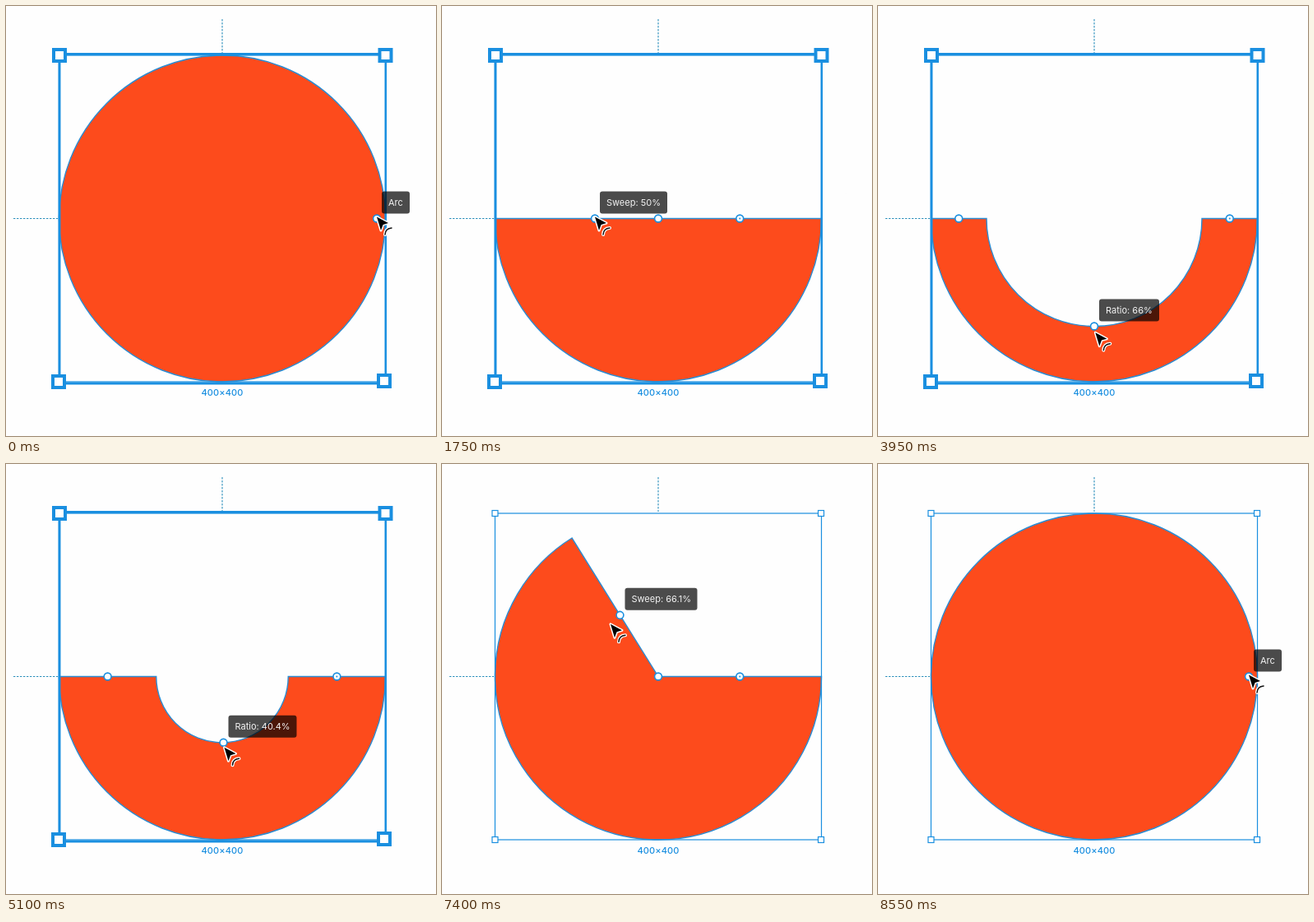
An HTML page that plays this animation: 523 by 523 pixels, repeating every 8.6 s.

```html
<!DOCTYPE html>
<html lang="en">
<head>
<meta charset="utf-8">
<title>Arc tool</title>
<style>
  html, body { margin: 0; width: 100%; height: 100%; overflow: hidden; background: #fefefe; }
  svg { position: absolute; left: 0; top: 0; }
  text, #tip { font: 11px Inter, sans-serif; }
  #size { fill: #1a8fe0; font-weight: 500; letter-spacing: .1px; text-anchor: middle; }
  #tip {
    position: absolute; left: 0; top: 0; box-sizing: border-box; height: 27px;
    padding: 0 8px; line-height: 27px; border-radius: 3px; white-space: nowrap;
    color: #f4f4f4; background: rgba(0, 0, 0, .7);
  }
  .guide { stroke: #2b8fbb; stroke-width: 1.1; stroke-dasharray: 2.4 1.6; }
  .box { fill: none; stroke: #1a8fe0; stroke-width: 1.2; }
  .grip { fill: #fff; stroke: #1a8fe0; stroke-width: 1.2; }
  .bold { fill: #fff; stroke: #1a8fe0; stroke-width: 4; }
  .knob { fill: #fff; stroke: #1a8fe0; stroke-width: 1.6; }
  #pie { fill: #fd4b1c; stroke: #2a8cd2; stroke-width: 1.4; }
</style>
</head>
<body>
<svg width="523" height="523" viewBox="0 0 523 523">
  <path class="guide" d="M263 16V58M9 258.5H63"/>
  <path id="pie" transform="translate(263 258.5)"/>
  <rect class="box" x="64.5" y="60" width="397" height="397"/>
  <g id="thin">
    <rect class="grip" x="61" y="56.5" width="7" height="7"/>
    <rect class="grip" x="457.5" y="56.5" width="7" height="7"/>
    <rect class="grip" x="61" y="453.5" width="7" height="7"/>
    <rect class="grip" x="457.5" y="453.5" width="7" height="7"/>
  </g>
  <g id="thick">
    <path d="M65 58.5H462M65 58.5V459M65 459H462" stroke="#1a8fe0" stroke-width="3"/>
    <path d="M461.8 58.5V459" stroke="#1a8fe0" stroke-width="2.5"/>
    <rect class="bold" x="58" y="53" width="14" height="14"/>
    <rect class="bold" x="454.5" y="53" width="14" height="14"/>
    <rect class="bold" x="57" y="450" width="14" height="14"/>
    <rect class="bold" x="453" y="449" width="14" height="14"/>
  </g>
  <text id="size" x="263" y="473.5">400×400</text>
  <g id="start">
    <circle class="knob" r="4.4"/>
    <circle r="1" fill="#1a8fe0"/>
  </g>
  <circle id="ratio" class="knob" r="4.4"/>
  <circle id="sweep" class="knob" r="4.4"/>
</svg>
<div id="tip"></div>
<svg width="523" height="523" viewBox="0 0 523 523">
  <g id="cursor" fill="none" stroke-linejoin="round" stroke-linecap="round">
    <path d="M10 21.5Q10.5 14 18 13.5" stroke="#fff" stroke-width="4"/>
    <path d="M10 21.5Q10.5 14 18 13.5" stroke="#111" stroke-width="1.5"/>
    <path d="M0 0L14 7.5L7.6 9.4L5 16.5Z" fill="#000" stroke="#fff" stroke-width="3" paint-order="stroke"/>
  </g>
</svg>
<script>
const LOOP = 8600, CX = 263, CY = 258.5, R = 198.5;
const $ = id => document.getElementById(id);
const pie = $('pie'), tip = $('tip');

// Monotone cubic curve through [time, value] points
function track(...p) {
  const slope = i => (p[i + 1][1] - p[i][1]) / (p[i + 1][0] - p[i][0]);
  const tangent = i => {
    if (i === 0 || i === p.length - 1) return 0;
    const a = slope(i - 1), b = slope(i);
    return a * b > 0 ? 2 * a * b / (a + b) : 0;
  };
  return t => {
    if (t <= p[0][0]) return p[0][1];
    const i = p.findIndex(q => q[0] >= t) - 1;
    if (i < 0) return p[p.length - 1][1];
    const h = p[i + 1][0] - p[i][0], u = (t - p[i][0]) / h, v = 1 - u;
    return p[i][1] * v * v * (1 + 2 * u) + p[i + 1][1] * u * u * (3 - 2 * u)
      + h * u * v * (tangent(i) * v - tangent(i + 1) * u);
  };
}

const gap = track([50, 0], [250, 12], [500, 45], [950, 103.7], [1400, 152], [1750, 180],
  [6500, 180], [7400, 122], [7900, 62], [8300, 12], [8430, 0]);
const reach = track([50, 188], [250, 150], [500, 118], [950, 92], [1750, 77], [2700, 77],
  [5700, 99.25], [6500, 99.25], [7400, 88], [8000, 112], [8300, 150], [8430, 188]);
const hole = track([3000, 0], [3350, .3], [3900, .655], [3950, .66], [4600, .66],
  [5100, .405], [5500, .1], [5700, 0]);
const drift = track([4600, 0], [5100, 1.5], [5600, 0]);
// Cursor: which knob it is at, and how far off it
const toRatio = track([1850, 0], [2400, 1], [5850, 1], [6300, 0]);
const offX = track([50, 0], [950, -5], [1750, 0], [2100, 0], [2450, -8], [2750, 1.5],
  [5100, 1], [6450, 0], [7400, -11.5], [8400, 0]);
const offY = track([50, -2], [950, -1], [1750, -2], [2450, 8], [2750, 6], [3350, 8],
  [5100, 6], [6300, 0], [7400, 11], [8400, -2]);

const percent = v => +v.toFixed(1) + '%';
const move = (el, x, y) => el.setAttribute('transform', `translate(${x} ${y})`);
const show = (el, on) => { el.style.display = on ? '' : 'none'; };

function outline(angle, inner) {
  if (angle < .01) return `M${R} 0A${R} ${R} 0 0 1 ${-R} 0A${R} ${R} 0 0 1 ${R} 0Z`;
  const c = Math.cos(angle), s = -Math.sin(angle), r = R * inner;
  const big = angle < Math.PI - .001 ? 1 : 0;
  const inside = r < .1 ? 'L0 0' : `L${r * c} ${r * s}A${r} ${r} 0 ${big} 0 ${r} 0`;
  return `M${R} 0A${R} ${R} 0 ${big} 1 ${R * c} ${R * s}${inside}Z`;
}

function label(t, deg, inner) {
  if (t < 250 || t >= 8350) return 'Arc';
  if (t < 1950) return 'Sweep: ' + percent(100 - deg / 3.6);
  if (t < 2400) return '';
  if (t < 3000) return 'Ratio';
  if (t < 5850) return 'Ratio: ' + percent(inner * 100);
  if (t < 6250) return '';
  return t < 6500 ? 'Sweep' : 'Sweep: ' + percent(100 - deg / 3.6);
}

function draw(t) {
  const deg = gap(t), angle = deg * Math.PI / 180, inner = hole(t);
  const mid = R / 2 * (1 + inner), free = t > 1850 && t < 6500;
  const polar = r => [CX + r * Math.cos(angle), CY - r * Math.sin(angle)];
  const drag = polar(reach(t)), sweep = free ? polar(mid) : drag;
  const ratio = [CX + drift(t), CY + R * inner];
  const open = angle >= .01;

  pie.setAttribute('d', outline(angle, inner));
  move($('start'), CX + mid, CY);
  move($('ratio'), ...ratio);
  move($('sweep'), ...sweep);
  show($('start'), open);
  show($('ratio'), open);
  show($('thick'), t < 6700);
  show($('thin'), t >= 6700);

  const w = toRatio(t);
  const [x, y] = [0, 1].map(i => drag[i] + (ratio[i] - drag[i]) * w);
  move($('cursor'), x + offX(t), y + offY(t));

  const text = label(t, deg, inner), at = text.startsWith('Ratio') ? ratio : sweep;
  show(tip, text);
  if (tip.textContent !== text) tip.textContent = text;
  tip.style.transform = `translate(${at[0] + 6}px, ${at[1] - 33}px)`;
}

function frame() {
  draw(performance.now() % LOOP);
  requestAnimationFrame(frame);
}
frame();
</script>
</body>
</html>
```
